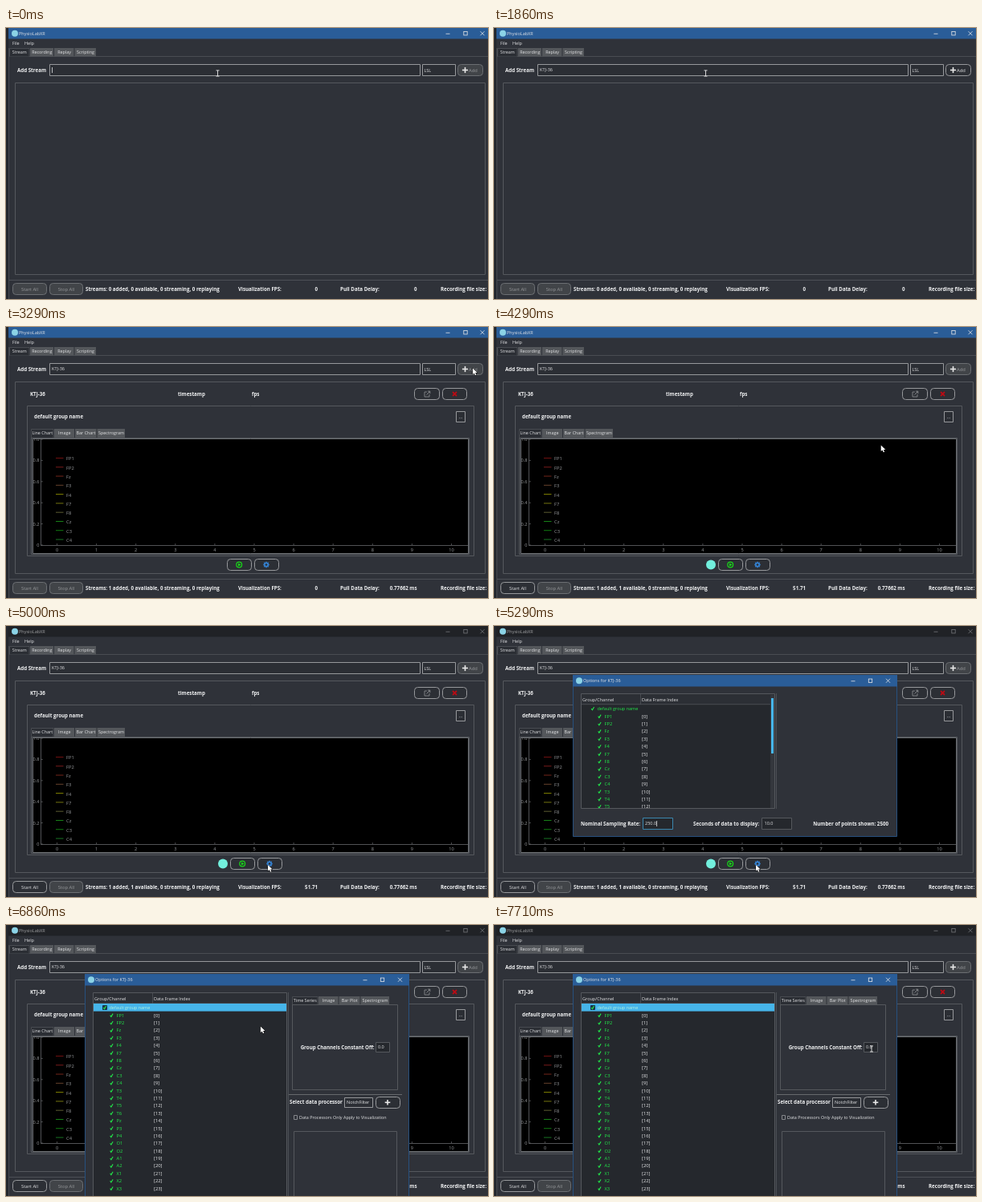
An HTML page with a canvas for the animation above (8000 ms loop, 600 by 338 pixels).

```html
<!DOCTYPE html>
<html lang="en">
<head>
<meta charset="utf-8">
<title>PhysioLabXR</title>
<style>
  html, body { margin: 0; width: 100%; height: 100%; overflow: hidden; background: #2f3239; }
  canvas { display: block; width: 600px; height: 338px; }
</style>
</head>
<body>
<canvas id="stage" width="600" height="338"></canvas>
<script>
const ctx = document.getElementById('stage').getContext('2d');
const LOOP = 8000, STEP = 1000 / 7;
const BG = '#2f3239', BLUE = '#2a5d98', INK = '#e4e5e7', SOFT = '#909296', DIM = '#97999c';
const EDGE = '#55585d', LIGHT = '#96989b', SKY = '#46b5ea', GREEN = '#22e84a';
const DEVICE = 'KTJ-36';
const CHANNELS = 'FP1 FP2 Fz F3 F4 F7 F8 Cz C3 C4 T3 T4 T5 T6 Pz P3 P4 O1 O2 A1 A2 X1 X2 X3'.split(' ');
const LEGEND = ['#701010', '#781a1a', '#74261a', '#66422c', '#848400', '#767610', '#5c5c32', '#188418', '#107c10', '#187424'];
const KEYS = [140, 280, 430, 570, 1000, 1140];

// y is the vertical centre of the capitals
function text(s, x, y, color = INK, size = 5.5, weight = 500, align = 'left') {
  ctx.font = `${weight} ${size}px "Open Sans", "Noto Sans", sans-serif`;
  ctx.textAlign = align;
  ctx.fillStyle = color;
  ctx.fillText(s, x, y + size * 0.36);
}
const bold = (s, x, y, align) => text(s, x, y, '#f0f1f2', 6.2, 700, align);

function fill(x, y, w, h, color) {
  ctx.fillStyle = color;
  ctx.fillRect(x, y, w, h);
}

function box(x, y, w, h, stroke, back, r = 0) {
  ctx.beginPath();
  ctx.roundRect(x + 0.5, y + 0.5, w - 1, h - 1, r);
  if (back) { ctx.fillStyle = back; ctx.fill(); }
  ctx.lineWidth = 1;
  ctx.strokeStyle = stroke;
  ctx.stroke();
}

function line(color, width, ...p) {
  ctx.beginPath();
  for (let i = 0; i < p.length; i += 2) ctx.lineTo(p[i], p[i + 1]);
  ctx.lineWidth = width;
  ctx.strokeStyle = color;
  ctx.stroke();
}

function disc(x, y, r, color) {
  ctx.beginPath();
  ctx.arc(x, y, r, 0, 7);
  ctx.fillStyle = color;
  ctx.fill();
}

function cross(x, y, r, color, width) {
  line(color, width, x - r, y - r, x + r, y + r);
  line(color, width, x + r, y - r, x - r, y + r);
}

function plus(x, y, r, color) {
  line(color, 1.6, x - r, y, x + r, y);
  line(color, 1.6, x, y - r, x, y + r);
}

function button(x, y, w, h, on, label) {
  box(x, y, w, h, on ? LIGHT : '#6b6e72', on ? '#2c2f35' : '#414448', 4);
  if (label) text(label, x + w / 2, y + h / 2, on ? INK : DIM, 5.8, 500, 'center');
}

// each tab: label, left edge, right edge; the first one is selected
function tabs(y, h, list) {
  list.forEach(([label, a, b], i) => {
    fill(a, y, b - a - 0.5, h, i ? '#54575b' : '#2b2e34');
    if (!i) line(EDGE, 0.7, a + 0.5, y + h, a + 0.5, y + 0.5, b - 0.5, y + 0.5, b - 0.5, y + h);
    text(label, (a + b) / 2, y + h / 2, INK, 5.4, 500, 'center');
  });
}

function titleBar(x, y, w, h, label, active, buttons) {
  fill(x, y, w, h, active ? BLUE : '#202226');
  const c = y + h / 2, icon = active ? INK : '#74767a';
  disc(x + 8, c, 4, '#8bd3e6');
  text(label, x + 13, c, active ? INK : '#a2a3a5');
  const [a, b, d] = buttons;
  line(icon, 0.8, a - 2.5, c + 0.5, a + 2.5, c + 0.5);
  ctx.strokeRect(b - 2.2, c - 2.2, 4.4, 4.4);
  cross(d, c, 2.5, icon, 0.8);
}

function mainWindow(t) {
  const added = t >= 3280, live = t >= 3990;
  fill(0, 0, 600, 338, BG);
  fill(0, 0, 3, 338, '#23272d');
  titleBar(3, 0, 597, 13.5, 'PhysioLabXR', t < 4990, [550, 572, 593]);
  text('File', 8, 19.5);
  text('Help', 23, 19.5);
  line(EDGE, 0.7, 4, 35.5, 600, 35.5);
  line('#484b51', 1, 3.5, 25, 3.5, 338);
  tabs(25, 10.5, [['Stream', 4, 29.5], ['Recording', 30, 59.5], ['Replay', 60, 85], ['Scripting', 85.5, 112.5]]);

  bold('Add Stream', 14, 53);
  box(54, 45, 462, 15, LIGHT, '#2b2e34');
  box(518, 45, 42, 15, LIGHT, '#2b2e34');
  text('LSL', 520.5, 53);
  const typed = DEVICE.slice(0, KEYS.filter(k => t >= k - 9).length);
  text(typed, 57, 52.5);
  if (t < 2850 && Math.floor(t / 530) % 2 === 0) {
    const x = 57.5 + ctx.measureText(typed).width;
    line(INK, 0.8, x, 49, x, 56);
  }
  const ready = typed && t < 2990;
  button(562, 45, 32, 15, ready);
  plus(571.5, 52.5, 3.6, '#e8e8e8');
  text('Add', 576, 53, ready ? INK : DIM, 5.8);

  box(11, 68, 586, 240, EDGE);
  if (added) streamPanel(live);

  line(EDGE, 0.8, 4, 314.5, 600, 314.5);
  button(8, 318, 43, 15, live, 'Start All');
  button(54, 318, 42, 15, false, 'Stop All');
  bold(`Streams: ${+added} added, ${+live} available, 0 streaming, 0 replaying`, 99, 325.5);
  bold('Visualization FPS:', 289, 325.5);
  bold(live ? '51.71' : '0', 388, 325.5, 'right');
  bold('Pull Data Delay:', 416, 325.5);
  bold(added ? '0.77662 ms' : '0', 511.5, 325.5, 'right');
  bold('Recording file size:', 541, 325.5);
}

function streamPanel(live) {
  bold(DEVICE, 30, 84);
  bold('timestamp', 214, 84);
  bold('fps', 306, 84);
  button(508, 76, 32, 15, true);
  line(SOFT, 0.8, 524, 81, 521, 81, 521, 87, 527, 87, 527, 84);
  line(SOFT, 0.9, 523.5, 84.5, 527.5, 80.5);
  line(SOFT, 0.9, 525.2, 80.2, 527.8, 80.2, 527.8, 83);
  button(543, 76, 31, 15, true);
  cross(558.5, 83.5, 2.5, '#b80c14', 1.8);

  box(26, 98, 557, 188, EDGE);
  bold('default group name', 35, 112);
  box(560, 105, 12, 14, LIGHT, '#2b2e34');
  text('...', 566, 112, INK, 5.5, 500, 'center');
  tabs(127, 11, [['Line Chart', 31, 59.5], ['Image', 60, 85.5], ['Bar Chart', 86, 113], ['Spectrogram', 113.5, 148.5]]);
  box(31, 138, 546, 146, EDGE);
  box(33, 139, 543, 144, '#696c70', '#000');
  plot();

  const x = live ? 279 : 275;
  if (live) disc(270, 296.5, 6, '#72efdd');
  button(x, 289, 31, 15, true);
  button(x + 34, 289, 31, 15, true);
  ctx.lineWidth = 1.2;
  ctx.strokeStyle = '#18d818';
  ctx.beginPath();
  ctx.arc(x + 15.2, 296.5, 3.4, 0, 7);
  ctx.stroke();
  ctx.beginPath();
  ctx.moveTo(x + 14, 294.5);
  ctx.lineTo(x + 17.6, 296.5);
  ctx.lineTo(x + 14, 298.5);
  ctx.fillStyle = '#18d818';
  ctx.fill();
  gear(x + 49, 296.5);
}

function gear(x, y) {
  for (let i = 0; i < 8; i++) {
    const a = i * Math.PI / 4;
    line('#3480d0', 1.5, x, y, x + 3.8 * Math.cos(a), y + 3.8 * Math.sin(a));
  }
  disc(x, y, 3, '#3480d0');
  disc(x, y, 1.3, '#2c2f35');
}

function plot() {
  const axis = '#66686b', ink = '#9a9c9f';
  ctx.save();
  ctx.beginPath();
  ctx.rect(34, 140, 541, 142);
  ctx.clip();
  line(axis, 0.8, 43.5, 140, 43.5, 272.5, 575, 272.5);
  for (let i = 0; i <= 10; i++) {
    const x = 63.5 + i * 49.1;
    line(axis, 0.7, x, 270, x, 272);
    text(i, x, 277.5, ink, 5.6, 500, 'center');
  }
  for (let i = 0; i <= 5; i++) {
    const y = 272 - i * 26.4;
    line(axis, 0.7, 43, y, 46, y);
    text(i ? (i / 5).toFixed(1) : '0', 41.5, y, ink, 5.6, 500, 'right');
  }
  LEGEND.forEach((color, i) => {
    const y = 164 + i * 11.28;
    line(color, 1, 62, y - 0.5, 71.5, y - 0.5);
    text(CHANNELS[i], 75, y + 0.3, ink, 5.8);
  });
  ctx.restore();
}

function tick(x, y) {
  line(GREEN, 1.1, x - 1.8, y, x - 0.6, y + 1.8, x + 1.6, y - 2);
}

function channelTable(bottom, picked) {
  box(108, 84, 242, bottom - 84, EDGE, '#25282d');
  fill(109, 85, 240, 13, '#2c2f35');
  text('Group/Channel', 110, 92);
  text('Data Frame Index', 184, 92);
  line(EDGE, 0.7, 182.5, 85, 182.5, 98);
  line(EDGE, 0.7, 109, 97.7, 349, 97.7);
  ctx.save();
  ctx.beginPath();
  ctx.rect(109, 98, 240, bottom - 99);
  ctx.clip();
  if (picked) {
    fill(109, 98, 240, 9.6, SKY);
    box(120, 100, 6, 6, '#15324a', '#203a48');
  }
  tick(123, 103);
  text('default group name', 128.5, 103, picked ? '#b4f0dc' : GREEN);
  CHANNELS.forEach((name, i) => {
    const y = 112.6 + i * 9.39;
    tick(131.5, y);
    text(name, 137.5, y, GREEN, 5.8);
    text(`[${i}]`, 184, y, INK, 5.8);
  });
  ctx.restore();
}

function optionsWindow(t) {
  const big = t >= 5850;
  box(98, 61, 404, big ? 300 : 202, '#27507f', BG);
  titleBar(98, 61, 404, 14.5, 'Options for ' + DEVICE, true, [447, 468.5, 490.5]);
  channelTable(big ? 350 : 228, big);
  line(EDGE, 0.8, 351.5, 84, 351.5, big ? 338 : 228);
  if (big) groupOptions();
  else streamOptions(t);
}

function streamOptions(t) {
  fill(344, 86, 5, 141, '#34373d');
  fill(345, 90, 3, 69, SKY);
  bold('Nominal Sampling Rate:', 108, 246.5);
  box(185, 239, 38, 15, '#3b86ae', '#25282d');
  text('250.0', 188, 246.5);
  if (t < 5670) line(INK, 0.8, 202.6, 243, 202.6, 250);
  bold('Seconds of data to display:', 248, 246.5);
  box(333, 239, 38, 15, EDGE, '#25282d');
  text('10.0', 336.5, 246.5);
  bold('Number of points shown: 2500', 491, 246.5, 'right');
}

function groupOptions() {
  tabs(89, 11, [['Time Series', 356, 388.5], ['Image', 389, 414], ['Bar Plot', 414.5, 441], ['Spectrogram', 441.5, 477.5]]);
  box(356, 99, 132, 107, EDGE);
  bold('Group Channels Constant Off:', 458.5, 152.5, 'right');
  box(460, 146, 18, 13, EDGE, '#25282d');
  text('0.0', 463, 152.5);
  line('#66696d', 1, 352, 211.5, 493, 211.5);
  bold('Select data processor', 353, 221);
  box(421, 215, 36, 13, LIGHT, '#2b2e34');
  text('NotchFilter', 424, 221.5);
  button(460, 214, 31, 15, true);
  plus(475, 221.3, 3.3, '#e8e8e8');
  box(358, 237, 5, 6, '#85878b');
  text('Data Processors Only Apply to Visualization', 365, 240.3, INK, 5.4);
  box(358, 257, 129, 100, EDGE);
}

const PATH = [
  { from: 1860, to: 2710, a: [263.5, 56.5], b: [581, 51.5] },
  { from: 3860, to: 4860, a: [581, 51.5], b: [326, 298] },
  { from: 5290, to: 5860, a: [326, 298], b: [166, 99] },
  { from: 6290, to: 7430, a: [166, 99], b: [470, 154.5] }
];

function pointer(t) {
  const leg = PATH.filter(p => t >= p.from).pop() || PATH[0];
  const u = Math.min(1, Math.max(0, (t - leg.from) / (leg.to - leg.from)));
  const e = u * u * (3 - 2 * u);
  const [x, y] = leg.a.map((v, i) => v + (leg.b[i] - v) * e);
  const overText = t < 2990 ? x < 515 : t > 6290 && x > 460;
  ctx.save();
  ctx.translate(x, y);
  if (overText) {
    line('#e8e8e8', 0.9, 0, -3.5, 0, 3.5);
    line('#e8e8e8', 0.9, -2, -3.6, 2, -3.6);
    line('#e8e8e8', 0.9, -2, 3.6, 2, 3.6);
  } else {
    const arrow = new Path2D('M0 0V7.6L1.8 6 3.1 8.8 4.4 8.2 3.2 5.5H5.6Z');
    ctx.lineWidth = 0.9;
    ctx.strokeStyle = '#000';
    ctx.stroke(arrow);
    ctx.fillStyle = '#fff';
    ctx.fill(arrow);
  }
  ctx.restore();
}

function draw() {
  const now = performance.now() % LOOP;
  const t = Math.floor((now + 6) / STEP) * STEP;
  mainWindow(t);
  if (t >= 5130) optionsWindow(t);
  pointer(t);
  requestAnimationFrame(draw);
}
draw();
</script>
</body>
</html>
```
